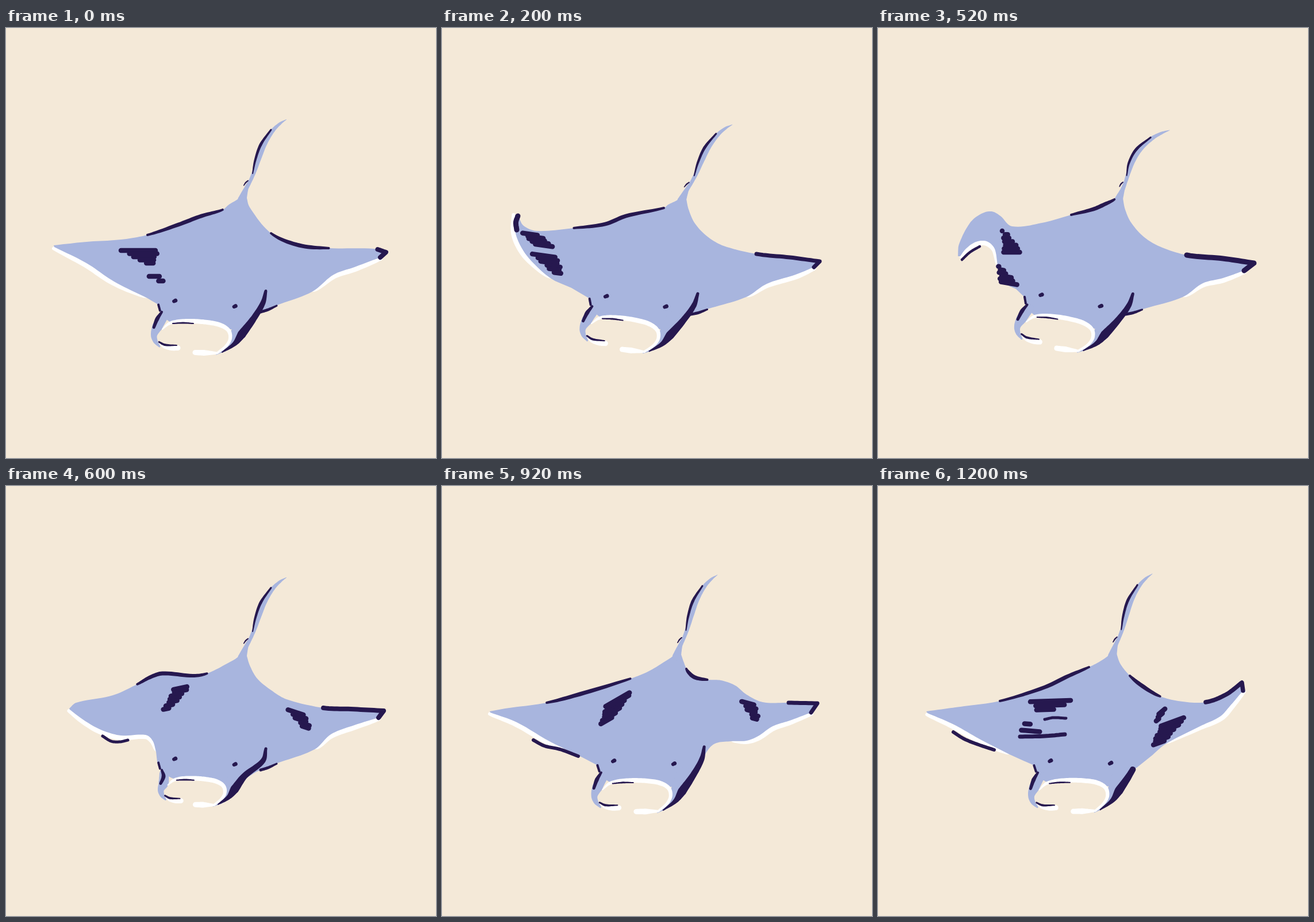
An HTML page that plays this animation: 748x748 px, repeating every 1400 ms.

```html
<!DOCTYPE html>
<html lang="en">
<head>
<meta charset="utf-8">
<title>Manta ray</title>
<style>
  html, body { margin: 0; width: 100%; height: 100%; overflow: hidden; background: #f4e9d8; }
  svg { display: block; width: 100vw; height: 100vh; }
  .pose { visibility: hidden; animation: hold 1400ms step-end infinite; }
  .skin { fill: #a8b5de; }
  .belly { fill: #fff; }
  .ink { fill: #26184f; }
  .pen { fill: none; stroke: #26184f; stroke-linecap: round; stroke-linejoin: round; }
  @keyframes hold {
    0% { visibility: visible; }
    14.2858%, 100% { visibility: hidden; }
  }
</style>
</head>
<body>
<svg id="stage" viewBox="0 0 748 748"></svg>
<script>
const STEPS = 10; // samples per span of a curve

const parse = text => text.trim().split(/\s+/).map(p => p.split(',').map(Number));
const mix = (a, b, t) => a + (b - a) * t;
const fix = p => p.slice(0, 2).map(n => n.toFixed(1)).join(' ');
const trace = points => 'M' + points.map(fix).join('L');

function unit(a, b) {
  const dx = b[0] - a[0], dy = b[1] - a[1], len = Math.hypot(dx, dy) || 1;
  return [dx / len, dy / len];
}

// Smooth open curve through key points; a third value is a width.
function spline(keys) {
  const last = keys.length - 1;
  const at = i => keys[Math.max(0, Math.min(last, i))];
  const out = [];
  for (let i = 0; i < last; i++) {
    const a = at(i), b = at(i + 1);
    const reach = Math.hypot(b[0] - a[0], b[1] - a[1]);
    const u = unit(at(i - 1), b), v = unit(a, at(i + 2));
    for (let k = 0; k < STEPS; k++) {
      const t = k / STEPS, s = 1 - t;
      const axis = j => s * s * (1 + 2 * t) * a[j] + t * t * (3 - 2 * t) * b[j] +
        reach * s * t * (s * u[j] - t * v[j]);
      out.push([axis(0), axis(1), mix(a[2], b[2], t)]);
    }
  }
  return [...out, at(last)];
}

const cut = (curve, from, to = Infinity) =>
  curve.slice(Math.round(from * STEPS), to * STEPS + 1);
const fill = (points, cls) => `<path class="${cls}" d="${trace(points)}Z"/>`;
const pen = (points, width) => `<path class="pen" stroke-width="${width}" d="${trace(points)}"/>`;

// Round-ended stroke of varying width; lift moves it outwards by a share of that width.
function brush(points, cls, lift = 0) {
  const last = points.length - 1;
  const side = sign => points.map((p, i) => {
    const [tx, ty] = unit(points[Math.max(0, i - 1)], points[Math.min(last, i + 1)]);
    const r = (lift + sign / 2) * p[2];
    return [p[0] + ty * r, p[1] - tx * r];
  });
  const out = side(-1), back = side(1).reverse();
  const cap = (p, to) => `A${p[2] / 2} ${p[2] / 2} 0 0 0 ${fix(to)}`;
  const d = trace(out) + cap(points[last], back[0]) + trace(back).replace('M', 'L') +
    cap(points[0], out[0]);
  return `<path class="${cls}" d="${d}Z"/>`;
}

// Width swells like part of a half wave, from phase a to phase b.
const swell = (points, width, a, b) => points.map((p, i) =>
  [p[0], p[1], width * Math.sqrt(Math.sin(Math.PI * mix(a, b, i / (points.length - 1))))]);

// Rows of jittered dashes between two places, each "x,y,length".
function scribble([ends, angle], seed) {
  const [a, b] = parse(ends);
  const rows = Math.max(2, Math.round(Math.hypot(b[0] - a[0], b[1] - a[1]) / 6));
  const jitter = i => {
    const n = Math.sin(i * 12.9 + seed * 78.2) * 43758.5;
    return (n - Math.floor(n) - 0.5) * 6;
  };
  const c = Math.cos(angle * Math.PI / 180), s = Math.sin(angle * Math.PI / 180);
  let dashes = '';
  for (let i = 0; i < rows; i++) {
    const [x, y, len] = a.map((n, j) => mix(n, b[j], i / (rows - 1)));
    const half = Math.max(0, len / 2 - 4), shift = jitter(i);
    dashes += pen([shift - half, shift + half].map(r => [x + r * c, y + r * s]), 8.5);
  }
  return dashes;
}

// Parts that keep their form and only tilt with the head.
const rigid = {
  skin: ['411,298,15 418,279,7.5 425,266,6 432.5,248,7 441,223,9 451,199,8.5 464.5,178,7 477,166,4.5 488,159,.5',
    '275,500,16 263,520,18 257.5,534,11 260,545,8 267,554,3',
    '415,505,30 402,530,22 388,553,10 366,567,3'],
  belly: ['272,524,2 284,514,5 300,510.5,7 325,510,8 350,512,8 372,516.5,8 387,526,7 390,540,6 383,553,5 368,565,4',
    '367,565.5,4 345,565,10 329,564.5,9', '266,547,2 275,554,6 288,557,8 299,556.5,9'],
  ink: ['429,253,2 433.5,230,4 443,203,5 461,177,3', '413.5,274,1.5 417,269,2.5 421,265.5,2',
    '290,514,2 308,513,3 326,514,2', '266,546,3 276,551,4 297,552,2',
    '265,481,4 268,492,4', '271,494,4 263,506,7 257,521,5',
    '292,475.5,6 295,474,7', '396.5,485,6 399.5,483.5,7']
};
const jaw = '452,457,5 447,478,9 431,505,11 410,533,15 398,549,8 376,564,2';
const branch = '443,494,5 456,490,5 471,483,3';
const tailLeft = '388,307 404,297 408,290', tailRight = '418,292 424,312';
const chin = '436,497 420,517 389,524 372,515 325,508 288,512 269,494 263,480';

// Wing edges run clockwise: left tip, tail, right tip, jaw; cheek, left tip.
// ridges, bellies and hooks are stretches of those edges, counted in key points.
const poses = [
  {
    eye: [293.5, 474.5], turn: 0,
    left: '83,378 140,372 200,368 246,360 300,342 340,327 377,316',
    right: '461,357 510,378 562,383 640,384 661,390',
    lowRight: '651,399 606,416 570,429 532,459',
    lowLeft: '246,470 188,441 140,409 84,381',
    ridges: [['left', 3, 6], ['right', 2, 4]], hook: [5.3, 8], bellies: [3, 0, 3],
    spots: [['233,387,68 249,409,20', 0], ['259,432,26 268,440,16', 0]]
  },
  {
    eye: [285.5, 466.5], turn: 4.7,
    left: '133,328 142,344 165,353 229,348 284,341 320,327 386,313',
    right: '440,340 462,363 490,379 547,393 605,399 657,406',
    lowRight: '647,416 615,429 565,445 529,468',
    lowLeft: '225,452 190,436 158,408 140,385 128,357 127,325',
    ridges: [['left', 3, 6]], hook: [5, 7], bellies: [3, 1, 5],
    strokes: [['132,327 128.5,338 130,351', 9]],
    spots: [['156,359,34 176,378,38', 8], ['178,396,48 201,426,20', 8]]
  },
  {
    eye: [284, 464], turn: 5.6, bow: 11,
    left: '139,397 141,376 160,339 178,324 197,319 213,327 233,345 285,339 336,325 375,315',
    right: '440,338 462,363 490,380 537,395 600,401 654,409',
    lowRight: '637,422 600,435 565,444 530,468',
    lowLeft: '240,454 225,446 210,420 204,387 197,376 185,370 168,373 152,385 143,397',
    ridges: [['left', 8, 11]], hook: [5, 9], bellies: [3, 2, 8],
    strokes: [['146,403 160,390 177,380', 4.5]],
    spots: [['219,353,8 235,390,36', 0], ['211,415,9 228,444,36', 10]]
  },
  {
    eye: [293.5, 474.5], turn: 0, pinch: 0.84,
    left: '110,387 122,377 186,364 228,345 250,333 272,326 325,330 350,326',
    right: '437,335 461,355 488,371 552,386 600,388 657,391',
    lowRight: '648,403 606,416 565,432 537,458',
    lowLeft: '261,462 255,443 243,433 200,434 165,424 135,407 111,389',
    ridges: [['left', 3, 7]], hook: [5, 8], bellies: [3, 0, 6],
    strokes: [['168,435 183,444 198,445 212,442', 5]],
    spots: [['306,351,32 281,387,18', -12], ['505,394,36 522,420,20', 18]]
  },
  {
    eye: [298.5, 478], turn: -2.46,
    left: '83,392 110,387 182,377 240,362 328,335 358,323',
    right: '428,323 440,333 462,337 485,338 510,347 530,363 558,376 603,377 653,378',
    lowRight: '642,394 605,408 575,418 550,435 530,443 503,444 475,448 460,463 452,485',
    lowLeft: '240,470 185,443 130,411 84,394',
    ridges: [['left', 2, 4], ['right', 1.6, 4]], hook: [9, 7], bellies: [5, 0, 3],
    strokes: [['159,442 178,452 205,458 237,470', 6]],
    spots: [['308,370,56 288,407,30', -30], ['533,378,30 545,405,16', 15]]
  },
  {
    eye: [305.5, 481], turn: -5.75, bow: 1.5,
    left: '86,407 160,393 200,383 252,369 284,359 302,346 320,335 353,324',
    right: '430,320 445,334 465,346 500,342 530,335 558,348 595,370 624,371 642,373',
    lowRight: '634,386 600,401 555,410 520,408 500,421 490,438 476,470 458,487',
    lowLeft: '272,487 213,466 170,444 125,423 87,410',
    ridges: [['left', 1, 3], ['left', 5, 7], ['right', 2, 7]], hook: [9, 6.5], bellies: [5, 1, 4],
    strokes: [['175,461 205,471 235,475 266,479', 6]],
    spots: [['310,375,42 294,406,18', -42], ['286,419,24 258,437,48', -14], ['484,366,26 478,404,18', -25],
      ['475,410,22 468,420,34', -20], ['557,354,22 567,384,28', 12]]
  },
  {
    eye: [299.5, 478], turn: -3, jawFrom: 1.7,
    left: '84,392 150,383 212,374 290,350 330,331 367,315',
    right: '438,330 460,348 491,366 530,375 570,376 605,363 633,342',
    lowRight: '635,356 612,383 595,401 560,418 500,449 475,470 450,490',
    lowLeft: '229,467 180,442 130,414 86,395',
    ridges: [['left', 2, 5], ['right', 2, 4]], hook: [6, 7.5], bellies: [4, 0, 3],
    strokes: [['131,428 150,440 175,450 202,459', 6], ['290,406 305,403 327,404', 5], ['247,436 290,435 325,432', 7]],
    spots: [['303,374,78 292,389,38', -2], ['261,414,18 264,426,40', 5],
      ['494,392,22 486,407,14', -40], ['513,410,50 491,446,28', -20]]
  }
];

// Head space to stage: bow the tail, pinch the mouth, then tilt about the left eye.
function place(text, { eye, turn, bow = 0, pinch = 1 }) {
  const c = Math.cos(turn * Math.PI / 180), s = Math.sin(turn * Math.PI / 180);
  return parse(text).map(([x, y, w]) => {
    if (y < 285) {
      const rise = (285 - y) / 126;
      x -= bow * Math.sin(Math.PI * Math.min(1, rise));
      y += bow * 0.8 * rise * rise;
    } else if (y > 500) {
      x = mix(332, x, pinch);
      y = mix(500, y, pinch);
    }
    x -= 293.5;
    y -= 474.5;
    return [eye[0] + x * c - y * s, eye[1] + x * s + y * c, w];
  });
}

function draw(pose, i) {
  const put = text => place(text, pose);
  const branched = pose.turn >= 0;
  const edge = {
    left: spline([...parse(pose.left), ...put(tailLeft)]),
    right: spline([...put(tailRight), ...parse(pose.right)]),
    lowRight: spline([...parse(pose.lowRight), ...(branched ? put('472,482') : [])]),
    lowLeft: spline(parse(pose.lowLeft))
  };
  const [rightEnd, leftStart, leftEnd] = pose.bellies;
  const parts = cls => rigid[cls].map(text => brush(spline(put(text)), cls)).join('');
  const body = [...edge.left, ...edge.right, ...edge.lowRight, ...spline(put(chin)), ...edge.lowLeft];

  return `<g class="pose" style="animation-delay:${i * 200 - 1400}ms">` +
    brush(swell(cut(edge.lowRight, 0, rightEnd), 9, 0.15, 1), 'belly', 0.42) +
    brush(swell(cut(edge.lowLeft, leftStart, leftEnd), 9, 0, 0.85), 'belly', 0.42) +
    fill(body, 'skin') + parts('skin') + parts('belly') + parts('ink') +
    brush(cut(spline(put(jaw)), pose.jawFrom || 0), 'ink') +
    (branched ? brush(spline(put(branch)), 'ink') : '') +
    pose.ridges.map(([name, from, to]) =>
      brush(swell(cut(edge[name], from, to), 7, 0.1, 0.9), 'ink')).join('') +
    pen([...cut(edge.right, pose.hook[0]), edge.lowRight[0]], pose.hook[1]) +
    (pose.strokes || []).map(([text, width]) => pen(spline(parse(text)), width)).join('') +
    pose.spots.map(scribble).join('') + '</g>';
}

document.getElementById('stage').innerHTML = poses.map(draw).join('');
</script>
</body>
</html>
```
